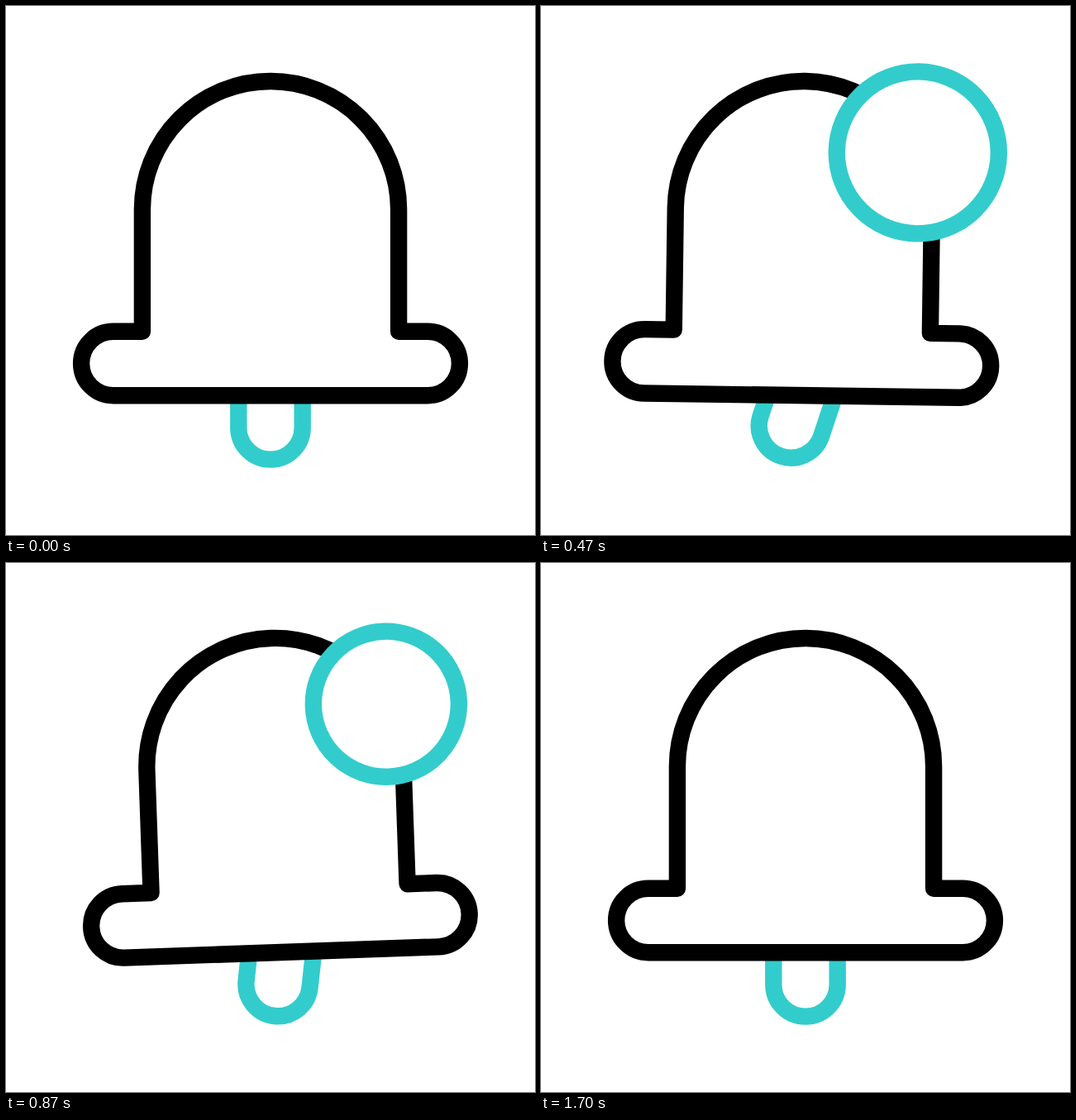
Animation, 640 px wide and 640 px high, one loop 2000 ms. Source, as an HTML page:

```html
<!DOCTYPE html>
<html lang="en">
<head>
<meta charset="utf-8">
<title>Notification bell</title>
<style>
  html, body { margin: 0; width: 100%; height: 100%; overflow: hidden; background: #fff; }
  svg { display: block; width: 100%; height: 100%; }
  path, circle { fill: #fff; stroke-width: 20.4; stroke-linejoin: round; }
  .dark { stroke: #000; }
  .teal { stroke: #3cc; }
</style>
</head>
<body>
<svg viewBox="0 0 640 640">
  <g id="bell">
    <path id="clapper" class="teal" d="M281.3 435V510a38.7 38.7 0 0 0 77.4 0V435"/>
    <path class="dark" d="M164.9 393.8V246.1a155.1 155.1 0 0 1 310.2 0V393.8H510.2a38.7 38.7 0 0 1 0 77.4H129.8a38.7 38.7 0 0 1 0-77.4Z"/>
    <circle id="badge" class="teal" cx="457" cy="175.5" r="0"/>
  </g>
</svg>
<script>
  const LOOP = 2000;
  const FPS = 30;

  // Keys are [frame, value]; each stretch eases in and out along a half cosine.
  const swing = [[0, 0], [10, 13.2], [17, -7.1], [22, 4.1], [26, -2], [29, 0]];
  const clap = [[0, 0], [11.75, 26.6], [19, -14.2], [26, 8.2], [37, -4], [49, 0]];
  const radius = [[7, 0], [16, 111], [22, 80.6], [31.5, 100.3], [42, 100.3], [51, 0]];

  const [bell, clapper, badge] = ['bell', 'clapper', 'badge'].map(id => document.getElementById(id));

  function tween(keys, frame) {
    const next = keys.findIndex(key => key[0] > frame);
    if (next === 0) return keys[0][1];
    if (next < 0) return keys[keys.length - 1][1];
    const [f0, v0] = keys[next - 1];
    const [f1, v1] = keys[next];
    const eased = (1 - Math.cos(Math.PI * (frame - f0) / (f1 - f0))) / 2;
    return v0 + (v1 - v0) * eased;
  }

  // Steps fall on whole hundredths of a second nearest to 30 per second.
  function frameAt(ms) {
    const tick = Math.floor(ms / 10) * 10;
    return Math.floor((tick + 5) * FPS / 1000);
  }

  const start = performance.now();

  function draw() {
    const frame = frameAt((performance.now() - start) % LOOP);
    bell.setAttribute('transform', `rotate(${tween(swing, frame)} 320 91)`);
    clapper.setAttribute('transform', `rotate(${tween(clap, frame)} 320 471.2)`);
    badge.setAttribute('r', tween(radius, frame));
    requestAnimationFrame(draw);
  }
  draw();
</script>
</body>
</html>
```
